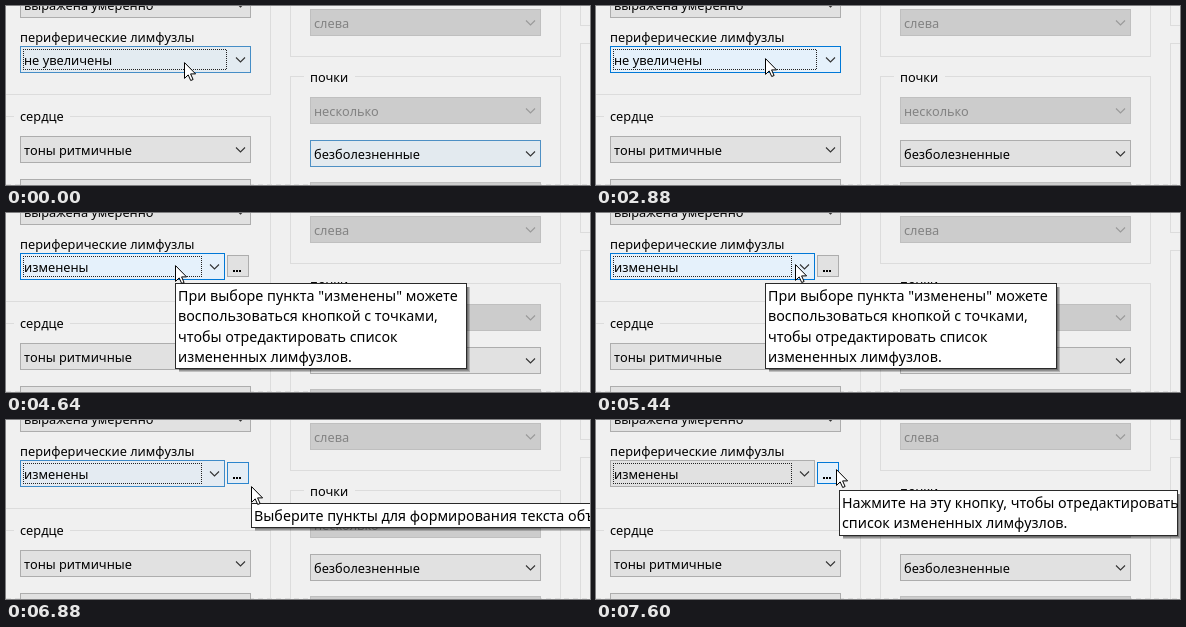
Animation, 584 px wide and 179 px high, one loop 9.52 s. Source, as an HTML page:

```html
<!DOCTYPE html>
<html lang="ru">
<head>
<meta charset="utf-8">
<style>
html, body { margin: 0; width: 100%; height: 100%; overflow: hidden; background: #f0f0f0; }
svg { display: block; width: 584px; height: 179px; }
text { font: 12.75px "Noto Sans", "Open Sans", sans-serif; white-space: pre; }
.tip text { font-size: 14.25px; }
rect, .line { shape-rendering: crispEdges; }
</style>
</head>
<body>
<svg id="stage" viewBox="0 0 584 179"></svg>
<script>
const LOOP = 9520, STEP = 40;
const stage = document.getElementById('stage');

function add(parent, tag, attrs = {}, text) {
  const el = document.createElementNS('http://www.w3.org/2000/svg', tag);
  set(el, attrs);
  if (text) el.textContent = text;
  parent.appendChild(el);
  return el;
}
function set(el, attrs) {
  for (const k in attrs) el.setAttribute(k, attrs[k]);
}
const show = (el, on) => el.setAttribute('visibility', on ? 'visible' : 'hidden');
const mix = (a, b, k) => `rgb(${a.map((v, i) => Math.round(v + (b[i] - v) * k))})`;
const ramp = (t, from, to) => Math.min(1, Math.max(0, (t - from) / (to - from)));
const label = (p, x, y, s, fill = '#000') => add(p, 'text', { x, y, fill }, s);
const frame = (p, x, y, w, h, fill, stroke) =>
  add(p, 'rect', { x: x + .5, y: y + .5, width: w - 1, height: h - 1, fill, stroke });
const line = (d, extra) => add(stage, 'path', { class: 'line', d, fill: 'none', stroke: '#dcdcdc', ...extra });

function combo(x, y, text, disabled) {
  const ink = disabled ? '#838383' : '#000';
  const box = frame(stage, x, y, 231, 27, disabled ? '#ccc' : '#e1e1e1', disabled ? '#bfbfbf' : '#adadad');
  const caption = label(stage, x + 4, y + 18.5, text, ink);
  const arrow = add(stage, 'path', {
    d: 'M-4.5-2.5L0 2L4.5-2.5', transform: `translate(${x + 220.5} ${y + 14})`,
    fill: 'none', stroke: disabled ? '#999' : '#333', 'stroke-width': 1.1
  });
  return { box, caption, arrow };
}
function hover(box, k) {
  set(box, { fill: mix([225, 225, 225], [229, 241, 251], k), stroke: mix([173, 173, 173], [0, 120, 215], k) });
}
function tooltip(from, to, x, y, w, lines) {
  const g = add(stage, 'g', { class: 'tip' });
  const h = Math.round(20.3 * lines.length + 5);
  for (let i = 3; i > 0; i--)
    add(g, 'rect', { x: x + 4, y: y + 4, width: w - 4 + i, height: h - 4 + i, opacity: .2 });
  frame(g, x, y, w, h, '#fff', '#2a2a2a');
  lines.forEach((s, i) => label(g, x + 3, y + 18 + 20.3 * i, s));
  return { g, from, to };
}

// Group boxes
line('M0 88.5H264.5V0M0 110.5H8M64 110.5H264.5V179');
line('M284.5 0V50.5H554.5V0M298 70.5H284.5V179M349 70.5H554.5V179');
line('M574.5 0V19.5H584M584 37.5H574.5V179');
line('M0 178.5H584', { 'stroke-dasharray': '5 4' });

combo(14, -15, 'выражена умеренно');
label(stage, 14, 36, 'периферические лимфузлы');
const nodes = combo(14, 40, 'не увеличены');
label(stage, 14, 115, 'сердце');
combo(14, 130, 'тоны ритмичные');
combo(14, 173, '');
combo(304, 3, 'слева', true);
label(stage, 304, 76, 'почки');
combo(304, 91, 'несколько', true);
const kidney = combo(304, 134, 'безболезненные');
combo(304, 176, '', true);

const focus = add(stage, 'rect', {
  x: 17.5, y: 43.5, height: 20, fill: 'none', stroke: '#222',
  'stroke-dasharray': '1 1', 'stroke-dashoffset': .5
});
const more = add(stage, 'g');
const moreBox = frame(more, 221, 42, 22, 22, '#e1e1e1', '#adadad');
for (let x = 227; x < 236; x += 3) add(more, 'rect', { x, y: 57, width: 2, height: 2 });

const hint = [
  'При выборе пункта "изменены" можете',
  'воспользоваться кнопкой с точками,',
  'чтобы отредактировать список',
  'измененных лимфузлов.'
];
const tips = [
  tooltip(440, 2880, 169, 70, 292, hint),
  tooltip(4640, 6760, 169, 70, 292, hint),
  tooltip(6880, 7000, 245, 83, 400, ['Выберите пункты для формирования текста объективного осмотра']),
  tooltip(7280, LOOP, 243, 70, 339, [
    'Нажмите на эту кнопку, чтобы отредактировать',
    'список измененных лимфузлов.'
  ])
];
const pointer = add(stage, 'path', {
  d: 'M.5.6V16.4L4.2 12.9L6.7 18.5L9.1 17.5L6.6 11.9H11.6Z', fill: '#fff', stroke: '#000'
});

// Pointer moves: from, to, dx, dy
const moves = [
  [40, 280, -9, -4], [5040, 5160, 5, 0], [5320, 5440, 25, -1],
  [6600, 6640, 12, 1], [6680, 6880, 34, 14], [6880, 7160, -4, -17], [7560, 7600, -1, 0]
];

function render(time) {
  const t = Math.floor(time / STEP) * STEP;
  const changed = t >= 4160;
  let x = 178, y = 56;
  for (const [from, to, dx, dy] of moves) {
    const k = ramp(t, from, to);
    x += dx * k;
    y += dy * k;
  }
  set(pointer, { transform: `translate(${Math.round(x)} ${Math.round(y)})` });

  nodes.caption.textContent = changed ? 'изменены' : 'не увеличены';
  set(nodes.box, { width: changed ? 204 : 230 });
  set(nodes.arrow, { transform: `translate(${changed ? 208.5 : 234.5} 54)` });
  set(focus, { width: changed ? 178 : 203 });
  show(more, changed);

  const settle = ramp(t, 40, 280);
  hover(nodes.box, .6 + .4 * settle - ramp(t, 6720, 7160));
  hover(kidney.box, .55 * (1 - settle));
  hover(moreBox, ramp(t, 6760, 6920));
  for (const { g, from, to } of tips) show(g, t >= from && t < to);
}

const start = performance.now();
function tick() {
  render((performance.now() - start) % LOOP);
  requestAnimationFrame(tick);
}
render(0);
requestAnimationFrame(tick);
</script>
</body>
</html>
```
